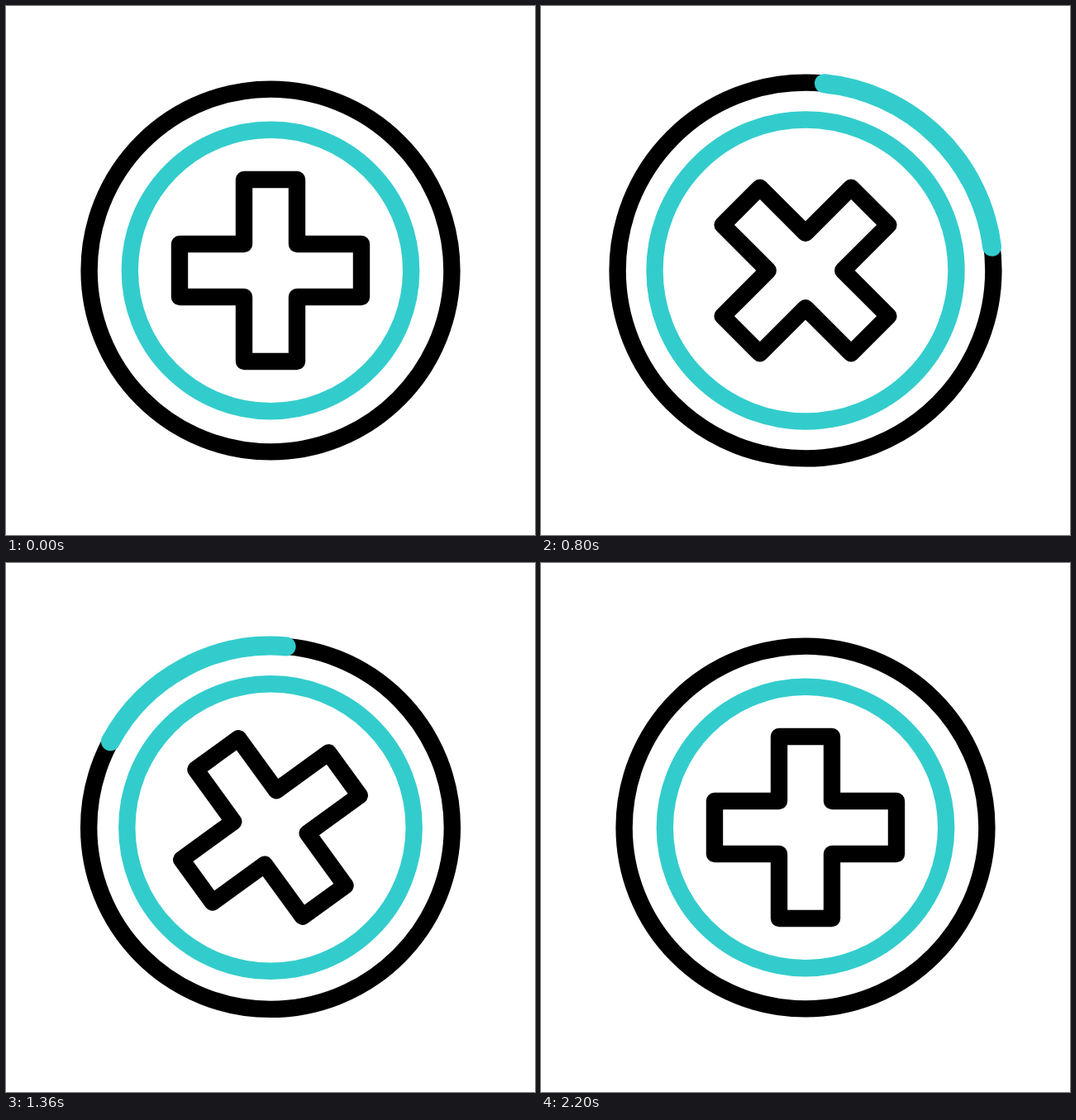
An HTML page that plays this animation: 640 by 640 pixels, repeating every 3600 ms.

```html
<!DOCTYPE html>
<html lang="en">
<head>
<meta charset="utf-8">
<title>Medical cross</title>
<style>
  html, body { margin: 0; height: 100%; overflow: hidden; background: #fff; }
  svg { display: block; width: 100%; height: 100%; }
  svg * { fill: none; stroke: #000; stroke-width: 20.4; stroke-linecap: round; stroke-linejoin: round; }
  .teal { stroke: #33cccc; }
  #arc { stroke-width: 23; }
</style>
</head>
<body>
<svg viewBox="-320 -320 640 640">
  <circle id="outer"/>
  <path id="arc" class="teal"/>
  <circle id="inner" class="teal"/>
  <path id="cross" d="M-32-110H32V-32H110V32H32V110H-32V32H-110V-32H-32Z"/>
</svg>
<script>
const STEP = 20, LOOP = 3600;
const [outer, arc, inner, cross] =
  ['outer', 'arc', 'inner', 'cross'].map(id => document.getElementById(id));

// Eased progress from 0 to 1 between two steps
function ease(step, from, to) {
  const s = Math.min(1, Math.max(0, (step - from) / (to - from)));
  return s * s * (3 - 2 * s);
}

// Two swells, each 20 steps up and 20 steps down
function pulse(step, from) {
  return [0, 20, 40, 60].reduce((sum, offset, i) =>
    sum + (i % 2 ? -1 : 1) * ease(step, from + offset, from + offset + 20), 0);
}

function pointAt(degrees, radius) {
  const a = degrees * Math.PI / 180;
  return `${radius * Math.sin(a)} ${-radius * Math.cos(a)}`;
}

function arcPath(start, end, radius) {
  if (end - start < 0.01) return '';
  const large = end - start > 180 ? 1 : 0;
  return `M${pointAt(start, radius)}A${radius} ${radius} 0 ${large} 1 ${pointAt(end, radius)}`;
}

function draw(time) {
  const step = Math.floor(time % LOOP / STEP);
  const radius = 219.4 + 16 * pulse(step, 30);
  outer.setAttribute('r', radius);
  inner.setAttribute('r', 170.2 + 12.4 * pulse(step, 21));

  const tail = 5 + 360 * ease(step, 39, 79);
  const head = 5 + 360 * ease(step, 28, 68);
  arc.setAttribute('d', arcPath(tail, head, radius));

  const angle = -135 * ease(step, 12.2, 39.2) - 315 * ease(step, 40.3, 92.7);
  cross.setAttribute('transform', `rotate(${angle})`);
}

const began = performance.now();
function tick() {
  draw(performance.now() - began);
  requestAnimationFrame(tick);
}
tick();
</script>
</body>
</html>
```
